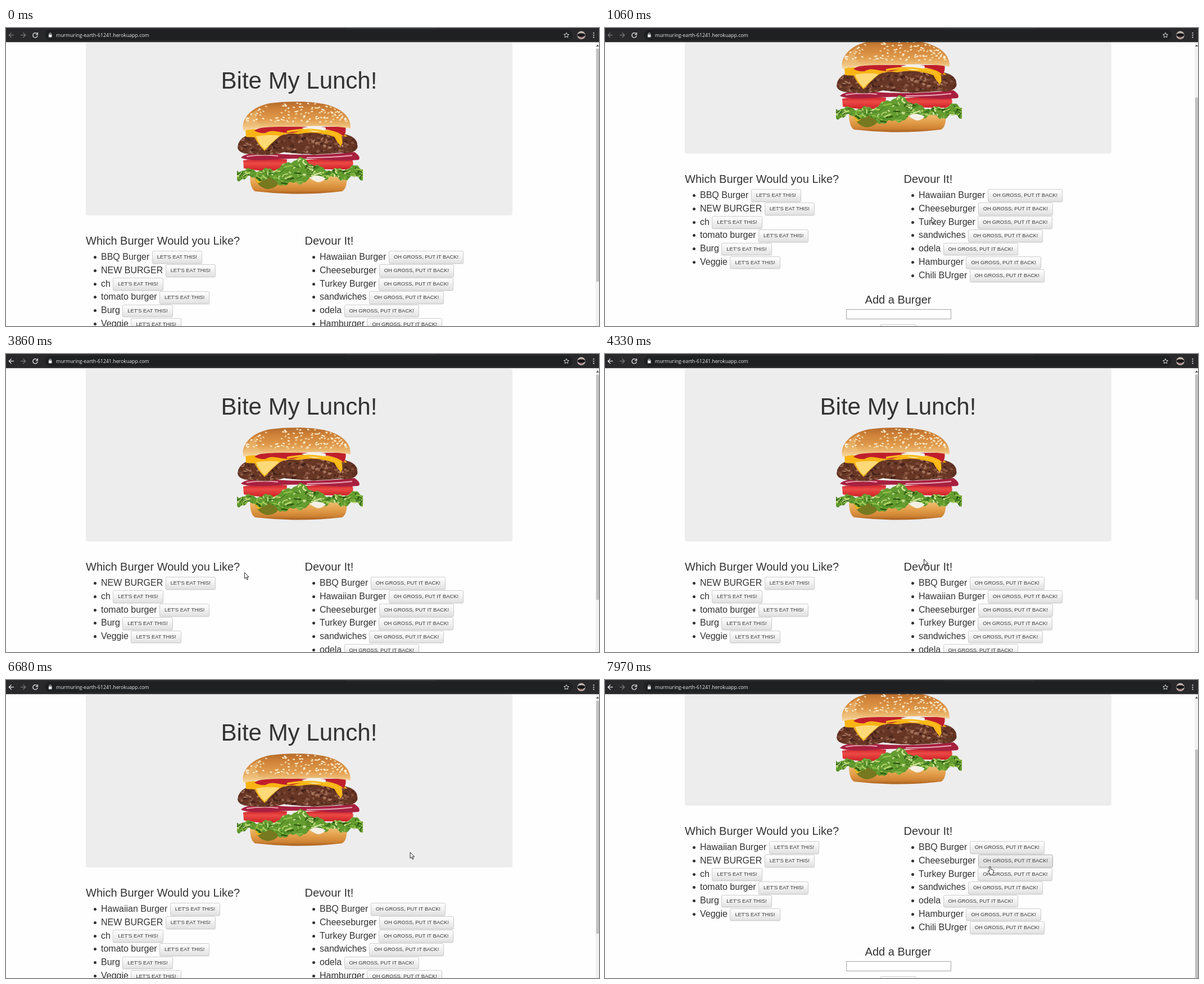
Recreate the animation shown at these times as an HTML page. Size 1055 by 531 pixels, loop 8 s.

```html
<!DOCTYPE html>
<html lang="en">
<head>
<meta charset="utf-8">
<title>Burger list</title>
<style>
html, body { margin: 0; width: 100%; height: 100%; overflow: hidden; background: #fefefe; }
#stage { position: relative; width: 1055px; height: 531px; overflow: hidden; color: #333;
  font-family: "Liberation Sans", Arial, sans-serif; white-space: nowrap; }
#stage * { box-sizing: border-box; }
#page, #page > *, #bar, #mouse, #track, #thumb { position: absolute; }
#page { left: 0; top: 0; width: 1049px; height: 700px; }
#jumbo { left: 142px; top: 25.5px; width: 759px; height: 308px; border-radius: 4px; background: #ededee; }
h1, h2, ul { margin: 0; padding: 0; font-weight: 400; list-style: none; }
h1 { left: 142px; width: 759px; top: 71px; font-size: 42px; line-height: 46.2px; text-align: center; }
h2 { font-size: 20px; line-height: 22px; top: 368px; }
ul { top: 396px; font-size: 16px; }
li { position: relative; height: 23.83px; line-height: 24px; }
li::before { content: ""; position: absolute; left: -13.5px; top: 10px; width: 5px; height: 5px;
  border-radius: 50%; background: #333; }
.btn { display: inline-block; vertical-align: middle; height: 22.67px; padding: 4px 8px;
  font-size: 9.33px; line-height: 13.33px; border: 1px solid #ccc; border-radius: 2.7px;
  background: #e0e0e0 linear-gradient(#fff, #e0e0e0) 0 0 / 100% 22px no-repeat;
  text-shadow: 0 1px 0 #fff; box-shadow: 0 1px 1px rgba(0,0,0,.075); }
.btn.hover { background-position: 0 -10px; border-color: #adadad; }
.btn.down { background: #dcdcdc; box-shadow: inset 0 2px 3px rgba(0,0,0,.125); }
#form { left: 142px; width: 759px; top: 582.6px; height: 90px; }
#form * { position: absolute; }
#form h2 { top: 0; width: 100%; text-align: center; }
#field { left: 286.5px; top: 28.4px; width: 187px; height: 17.6px; background: #fff; border: 1px solid #a5a5a5; }
#send { left: 347px; top: 55.4px; width: 65px; }
#track { left: 1049px; top: 25px; width: 6px; height: 506px; background: #f1f1f1; }
#thumb { left: 1050px; width: 5px; background: #c1c1c1; }
#bar, #mouse { left: 0; top: 0; pointer-events: none; }
#mouse { overflow: visible; }
#mouse path { fill: #fff; stroke: #111; stroke-width: .9; stroke-linejoin: round; }
</style>
</head>
<body>
<div id="stage">
  <div id="page">
    <div id="jumbo"></div>
    <h1>Bite My Lunch!</h1>
    <svg id="burger" style="left:0;top:0" width="1049" height="334"></svg>
    <h2 style="left:142px">Which Burger Would you Like?</h2>
    <h2 style="left:531.5px">Devour It!</h2>
    <ul id="menu" style="left:169px"></ul>
    <ul id="eaten" style="left:558px"></ul>
    <div id="form"><h2>Add a Burger</h2><div id="field"></div><div id="send" class="btn"></div></div>
  </div>
  <div id="track"></div>
  <div id="thumb"></div>
  <svg id="bar" width="1055" height="531">
    <path d="M1050 33h5l-2.5-3.5z" fill="#505050"/>
    <path d="M0 0H1055V25.3H0z" fill="#29292c"/>
    <rect x="69" y="3" width="939" height="19" rx="9.5" fill="#1f2022"/>
    <path d="M605 0H763V.8H605z" fill="#3a3b3e"/>
    <g fill="none" stroke="#e8eaed" stroke-width="1.3">
      <path id="back" d="M14 12.7H5.5M9.6 8.4L5.3 12.7L9.6 17"/>
      <path d="M26 12.7H34.5M30.4 8.4L34.7 12.7L30.4 17" stroke="#77797c"/>
      <path id="reload" d="M55.3 10.2A4.2 4.2 0 1 0 56.2 13.5M56.4 8V11.6H52.8"/>
      <path id="stop" d="M48.3 9L55.7 16.4M55.7 9L48.3 16.4"/>
      <path d="M77 11.8V10.6a1.7 1.7 0 0 1 3.4 0V11.8" stroke-width="1"/>
      <path d="M997 8.3l1.3 3 3.2.3-2.4 2.1.7 3.2-2.8-1.7-2.8 1.7.7-3.2-2.4-2.1 3.2-.3z" stroke-width=".9"/>
    </g>
    <path d="M75.9 11.5h5.6v5h-5.6z" fill="#e8eaed"/>
    <text x="89" y="16" font-size="8.75" font-family="'Open Sans', sans-serif" fill="#e8eaed">murmuring-earth-61241.herokuapp.com</text>
    <circle cx="1023.5" cy="12.8" r="7.3" fill="#c4b6ae"/>
    <ellipse cx="1023.5" cy="12.6" rx="7" ry="3.4" fill="#17171b"/>
    <path d="M1019.5 16.5h8a6 6 0 0 1-8 0z" fill="#8a4a4e"/>
    <g fill="#e8eaed"><circle cx="1045.5" cy="9" r="1.1"/><circle cx="1045.5" cy="12.8" r="1.1"/><circle cx="1045.5" cy="16.6" r="1.1"/></g>
  </svg>
  <svg id="mouse" width="20" height="20">
    <path id="arrow" d="M0 0V10.6L2.5 8.4L4.2 12.6L6 11.8L4.2 7.8H7.5Z"/>
    <path id="hand" d="M-1.2 1Q0 -.4 1.2 1V5.4L5.2 6.2Q6.6 6.7 6.4 8.4L5.4 13.2V15.4H0V13.6L-3.4 9.2Q-3.8 7.6 -2.4 7.9L-1.2 9Z"/>
  </svg>
</div>
<script>
const $ = id => document.getElementById(id);
const LOOP = 8000, ROW = 23.83, NOTCH = 66.67;

// Bursts of picture changes: start, end, number of steps
const bursts = [
  [0, 0, 1], [280, 1060, 11], [1460, 2060, 9], [2440, 2610, 3], [2990, 2990, 1],
  [3160, 3860, 10], [4160, 4950, 11], [5030, 5250, 4], [5490, 5960, 7], [6190, 6190, 1],
  [6360, 6360, 1], [6680, 7430, 11], [7510, 7590, 2], [7740, 7970, 4]
];

// Scroll position: time, pixels
const scrollKeys = [
  [600, 0], [826, NOTCH], [904, NOTCH], [1060, 110], [3160, 110], [3160, 0],
  [4500, 0], [4710, NOTCH], [4760, NOTCH], [4950, 2 * NOTCH], [6680, 2 * NOTCH], [6680, 0],
  [7120, 0], [7355, NOTCH], [7590, 110]
];

// Pointer hotspot: time, x, y
const mouseKeys = [
  [202, 640, 531], [600, 581, 337], [1385, 581, 337], [2060, 320.5, 299.5],
  [3082, 320.5, 299.5], [3860, 424.5, 389.5], [4081, 424.5, 389.5], [4560, 715, 341],
  [4950, 715, 341], [5103, 726.5, 295.5], [5177, 726.5, 295.5], [5250, 722, 341],
  [5412, 722, 341], [5960, 726.5, 295.5], [6680, 726.5, 295.5], [6680, 719, 307],
  [6740, 719, 307], [7200, 528, 392], [7663, 528, 392], [7970, 685, 332]
];

const bbq = "BBQ Burger", hawaii = "Hawaiian Burger";
const rest = ["NEW BURGER", "ch", "tomato burger", "Burg", "Veggie"];
const done = ["Cheeseburger", "Turkey Burger", "sandwiches", "odela", "Hamburger", "Chili BUrger"];
const phases = [
  [[bbq, ...rest], [hawaii, ...done]],
  [rest, [bbq, hawaii, ...done]],
  [[hawaii, ...rest], [bbq, ...done]]
];

function snap(t) {
  const [a, b, n] = bursts.filter(w => w[0] <= t).pop();
  const step = (b - a) / (n - 1) || 1;
  return Math.min(b, a + Math.floor((t - a) / step + 1e-6) * step);
}

function sample(keys, t, col = 1) {
  const i = keys.findIndex(k => k[0] > t);
  if (i < 0) return keys[keys.length - 1][col];
  if (i === 0) return keys[0][col];
  const p = keys[i - 1], q = keys[i], u = (t - p[0]) / (q[0] - p[0]);
  return p[col] + (q[col] - p[col]) * u * u * (3 - 2 * u);
}

const items = (names, label) =>
  names.map(n => `<li>${n} <span class="btn">${label}</span></li>`).join("");

let shown = -1, extra = 0;
function setPhase(p) {
  if (p === shown) return;
  shown = p;
  const [left, right] = phases[p];
  $("menu").innerHTML = items(left, "LET'S EAT THIS!");
  $("eaten").innerHTML = items(right, "OH GROSS, PUT IT BACK!");
  extra = right.length - 7;
  $("form").style.top = 582.6 + extra * ROW + "px";
}

const show = (id, on) => { $(id).style.visibility = on ? "visible" : "hidden"; };
const within = (t, a, b) => t >= a && t < b;

function draw(now) {
  const t = snap(now % LOOP);
  setPhase(t < 3160 ? 0 : t < 6680 ? 1 : 2);

  const y = sample(scrollKeys, t);
  $("page").style.transform = `translateY(${-Math.floor(y)}px)`;
  $("thumb").style.top = 37 + y * (extra ? .757 : .79) + "px";
  $("thumb").style.height = (extra ? 401 : 415) + "px";

  const mx = sample(mouseKeys, t, 1), my = sample(mouseKeys, t, 2), on = t >= 280;
  const hit = on && document.elementFromPoint(mx, my);
  const btn = hit && hit.closest(".btn");
  const down = within(t, 2440, 2500) || within(t, 6190, 6360);
  document.querySelectorAll(".btn").forEach(b => {
    b.classList.toggle("hover", b === btn);
    b.classList.toggle("down", b === btn && down);
  });
  const hand = btn && !within(t, 2990, 3160);
  $("mouse").style.transform = `translate(${mx}px, ${my}px)`;
  show("arrow", on && !hand);
  show("hand", on && hand);

  const loading = within(t, 2600, 3160) || within(t, 6360, 6680);
  show("reload", !loading);
  show("stop", loading);
  $("back").setAttribute("stroke", t < 2990 ? "#77797c" : "#e8eaed");
}

function burger() {
  let seed = 11;
  const rnd = (a, b) => a + (b - a) * ((seed = seed * 16807 % 2147483647) / 2147483647);
  const many = (n, f) => Array.from({ length: n }, (_, i) => f(i)).join("");
  const pick = list => list[Math.floor(rnd(0, list.length))];
  const shape = (d, fill, more = "") => `<path d="${d}" fill="${fill}" ${more}/>`;
  const blob = (x, y, rx, ry, fill) =>
    `<ellipse cx="${x}" cy="${y}" rx="${rx}" ry="${ry}" fill="${fill}" transform="rotate(${rnd(-40, 40)} ${x} ${y})"/>`;
  const grad = (id, stops) => `<linearGradient id="${id}" x2="0" y2="1">` +
    stops.map(([o, c]) => `<stop offset="${o}" stop-color="${c}"/>`).join("") + "</linearGradient>";
  const clip = (id, d) => `<clipPath id="${id}"><path d="${d}"/></clipPath>`;

  const bun = "M422 183C418 163 434 141 470 134C505 130 545 130 572 137C600 145 614 160 613 179Q570 172 520 176Q460 174 422 183Z";
  const patty = "M412 213Q414 197 428 192Q470 182 520 188Q580 180 612 192Q627 198 625 214Q618 226 595 222Q545 229 495 221Q470 229 440 225Q414 225 412 213Z";
  const base = "M434 262H606Q608 285 598 291Q520 300 443 291Q434 286 434 262Z";
  const seeds = many(110, () => {
    const x = rnd(428, 606), u = (x - 517) / 96, top = 134 + 34 * u ** 4 + 3 * u * u;
    return blob(x, top + (168 - top) * rnd(0, 1) ** 1.2, 2.1, 1.2, pick(["#f8e8c6", "#f1d7a3", "#fbf0d8"]));
  });
  const meat = many(300, () =>
    blob(rnd(412, 626), rnd(187, 226), rnd(1.5, 3.8), rnd(1, 2.4), pick(["#43211a", "#8d5a45", "#5b2e1e", "#a3735c", "#7a4936"])));

  const top = x => 253 - 20 * Math.exp(-(((x - 522) / 30) ** 2)) - 6 * Math.exp(-(((x - 620) / 18) ** 2)) + 3 * Math.sin(x * .2) + Math.sin(x * .61);
  const low = x => 268 + 11 * Math.exp(-(((x - 503) / 28) ** 2)) + 4 * Math.sin(x * .17) + 1.5 * Math.sin(x * .52);
  const xs = Array.from({ length: 113 }, (_, i) => 411 + i * 2);
  const leaf = "M" + xs.map(x => `${x} ${top(x)}`).join("L") + "L" +
    [...xs].reverse().map(x => `${x} ${low(x)}`).join("L") + "Z";
  const frills = many(170, () => {
    const x = rnd(411, 634), y = top(x) + (low(x) - top(x)) * rnd(0, 1);
    return `<path d="M${x} ${y}q${rnd(-8, 8)} ${rnd(-4, 5)} ${rnd(-13, 13)} ${rnd(-2, 9)}" fill="none" ` +
      `stroke="${pick(["#b5d46c", "#3f7a20", "#8fbf45", "#28540f", "#cfe397", "#4f8c28"])}" stroke-width="${rnd(.6, 3)}"/>`;
  });

  $("burger").innerHTML = `<defs>
    ${grad("gBun", [[0, "#b56b2b"], [.25, "#cf8238"], [.6, "#e09a4b"], [.83, "#edbd76"], [1, "#fae9c4"]])}
    ${grad("gBase", [[0, "#efc276"], [.45, "#e39f4b"], [.8, "#cf8334"], [1, "#a9601f"]])}
    ${grad("gTom", [[0, "#c81f2a"], [.4, "#ec4a45"], [1, "#cf2027"]])}
    ${clip("cBun", bun)}${clip("cMeat", patty)}${clip("cLeaf", leaf)}</defs>
    ${shape(base, "url(#gBase)")}
    ${shape("M441 262Q470 258 490 268Q484 286 465 287Q446 284 441 262Z", "#76791f")}
    ${shape("M443 264q7 1 12 9l-7 4q-5-5-5-13z", "#f3b422")}
    ${shape("M422 236Q455 230 500 234L498 254Q450 256 423 250Z", "url(#gTom)")}
    ${shape("M520 236Q575 231 616 235Q622 247 606 252Q560 252 526 250Z", "url(#gTom)")}
    ${shape("M418 231Q430 220 470 223Q540 230 620 221Q633 230 627 235Q590 238 560 234Q510 231 470 235Q430 237 418 231Z", "#a8203f")}
    ${shape("M428 229Q455 225 484 228M535 231Q580 231 616 227", "none", 'stroke="#e9a9b8" stroke-width="1.8"')}
    ${shape(leaf, "#649c30")}<g clip-path="url(#cLeaf)">${frills}</g>
    ${shape("M540 267q10-6 20-3t8 5q-9 8-16 5t-12-7z", "#f5f0e4")}
    ${shape(patty, "#673625")}<g clip-path="url(#cMeat)">${meat}</g>
    ${shape("M426 181Q470 178 510 184Q550 179 578 182Q602 185 607 194L597 192Q600 203 596 211Q588 202 584 194Q550 182 520 189Q500 186 487 193Q472 205 460 219Q446 205 443 195L427 194Z", "#f9b414")}
    ${shape("M445 193Q466 189 487 192Q474 203 460 216Q449 206 445 193Z", "#fdd978")}
    ${shape("M442 183Q455 173 500 176H604Q606 184 601 193Q590 184 572 181Q535 179 510 187Q496 187 486 185Q470 181 462 187Q450 188 442 183Z", "#bf1f2c")}
    ${shape("M526 178Q545 173 568 177Q572 183 560 185Q537 186 526 178Z", "#f4f1ec")}
    ${shape("M500 185Q540 177 575 186Q596 190 597 206", "none", 'stroke="#fbbd1d" stroke-width="3.4"')}
    ${shape(bun, "url(#gBun)")}<g clip-path="url(#cBun)">
    ${shape("M421 186Q424 160 450 143Q436 168 462 178Z", "#f0c584", 'opacity=".45"')}${seeds}</g>`;
}

burger();
function frame() {
  draw(performance.now());
  requestAnimationFrame(frame);
}
frame();
</script>
</body>
</html>
```
